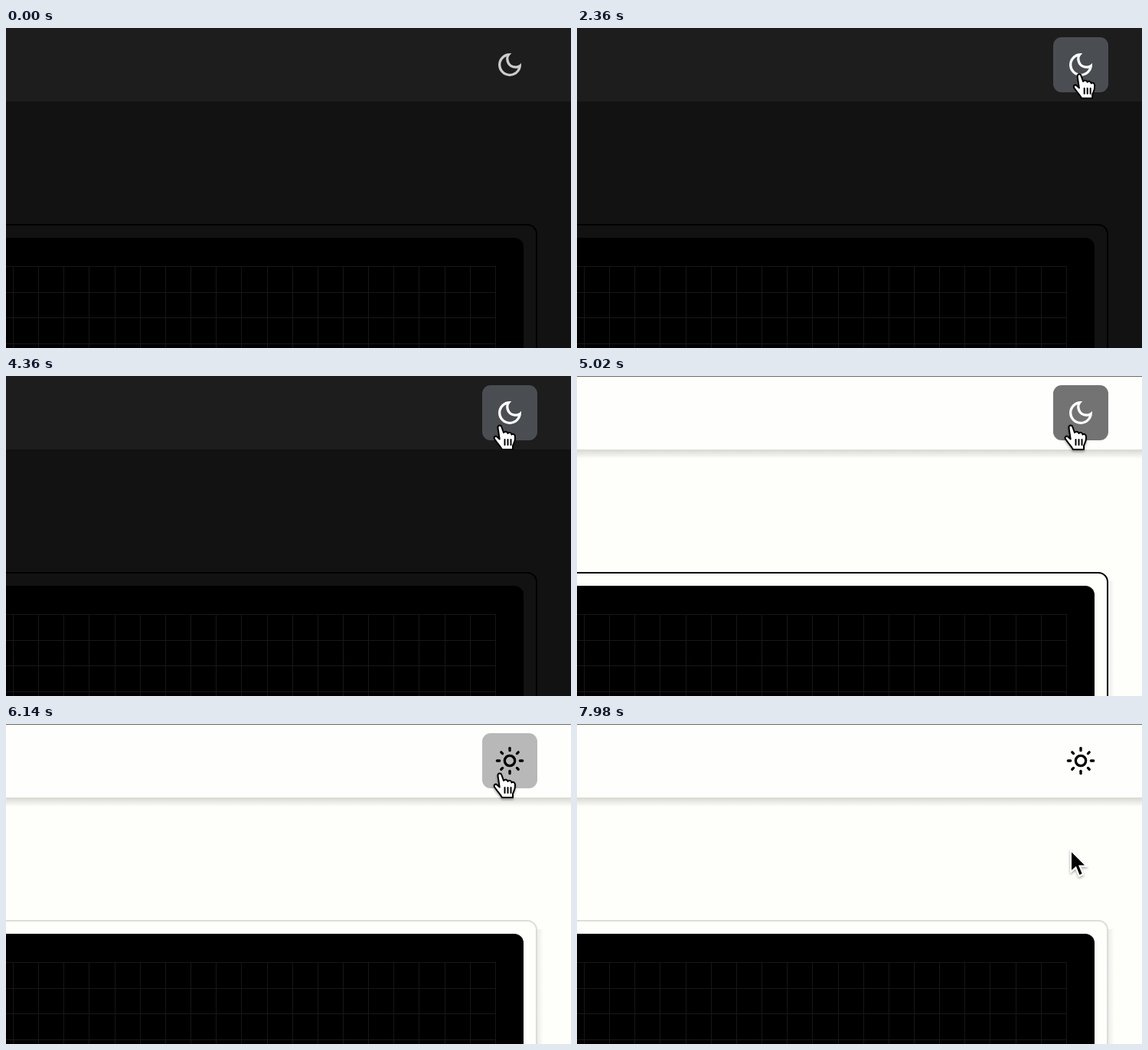
An HTML page that plays this animation: 738x418 px, repeating every 8000 ms.

```html
<!DOCTYPE html>
<html lang="en">
<head>
<meta charset="utf-8">
<title>Theme toggle</title>
<style>
  html, body { margin: 0; width: 100%; height: 100%; overflow: hidden; background: #121212; }
  svg { display: block; width: 100vw; height: 100vh; }
  .line { fill: none; stroke-width: 2; stroke-linecap: round; stroke-linejoin: round; }
</style>
</head>
<body>
<svg viewBox="0 0 738 418" preserveAspectRatio="none">
  <defs>
    <linearGradient id="under" x2="0" y2="1">
      <stop offset="0" stop-opacity=".13"/>
      <stop offset="1" stop-opacity="0"/>
    </linearGradient>
    <linearGradient id="side">
      <stop offset="0" stop-opacity=".07"/>
      <stop offset="1" stop-opacity="0"/>
    </linearGradient>
    <filter id="soft" x="-50%" y="-50%" width="200%" height="200%">
      <feDropShadow dx="0" dy="2" stdDeviation="1.6" flood-opacity=".35"/>
    </filter>
  </defs>

  <rect id="page" width="738" height="418"/>
  <rect id="header" width="738" height="96"/>
  <g id="light">
    <rect width="738" height="1" fill="#6c6c60"/>
    <rect y="96" width="738" height="2" fill="#dcdcd4"/>
    <rect y="98" width="738" height="10" fill="url(#under)"/>
    <rect x="694" y="268" width="8" height="150" fill="url(#side)"/>
  </g>
  <path id="border" class="line" d="M-2 257H681a12 12 0 0 1 12 12V420"/>
  <path d="M0 274H664a12 12 0 0 1 12 12V418H0Z"/>
  <g id="grid" fill="#171717" shape-rendering="crispEdges"></g>

  <rect id="button" x="622" y="12" width="72" height="72" rx="11"/>
  <g id="icon" transform="translate(638 28) scale(1.6667)">
    <path id="moon" d="M9.37 5.51C9.19 6.15 9.1 6.82 9.1 7.5c0 4.08 3.32 7.4 7.4 7.4.68 0 1.35-.09 1.99-.27C17.45 17.19 14.93 19 12 19c-3.86 0-7-3.14-7-7 0-2.93 1.81-5.45 4.37-6.49zM12 3a9 9 0 1 0 9 9c0-.46-.04-.92-.1-1.36a5.39 5.39 0 0 1-4.4 2.26 5.4 5.4 0 0 1-3.14-9.8C12.92 3.04 12.46 3 12 3z"/>
    <g id="sun" class="line"><circle cx="12" cy="12" r="4"/></g>
  </g>

  <g id="cursor">
    <path id="arrow" d="M0 0V28L6.5 22.5L11 33.5L16 31L11.5 20.5H20.5Z" stroke="#fff" stroke-width="2"/>
    <g id="hand" class="line" stroke="#000">
      <path fill="#fff" d="M-2.5 2C-3-2 1.5-3 2.5 1L5 8C6 6 10 6.5 10.5 9C11.5 7 15 7.5 15.5 10.5C17 9 20 10 20 13.5C20.5 19 18 22 17 25V30H3C1 26-3 22-6.5 17C-9 13.5-5.5 11.5-3.5 13.5L-.3 16.5Z"/>
      <path d="M6.5 17V24M10.5 17V24M14.5 17V24"/>
    </g>
  </g>
</svg>
<script>
const LOOP = 8000, CLICK = 4900, SWAP = 5060;
const HOVERS = [[1550, 2800], [3700, 7760]];
const PATH = [
  { t: 820, x: 746, y: 104 }, { t: 1560, x: 692, y: 26 },
  { t: 3060, x: 627, y: 91 }, { t: 3500, x: 629, y: 91 },
  { t: 4100, x: 645, y: 66 }, { t: 7700, x: 645, y: 66 },
  { t: 7920, x: 645, y: 165 }
];

const $ = id => document.getElementById(id);
const set = (id, name, value) => $(id).setAttribute(name, value);
const show = (id, on) => set(id, 'visibility', on ? 'visible' : 'hidden');
const mix = (a, b, k) => a + (b - a) * k;
const grey = v => `rgb(${[v, v, v].map(Math.round)})`;

// Eased 0 to 1, starting at a given time
function ramp(t, from, length) {
  const k = Math.min(1, Math.max(0, (t - from) / length));
  return k * k * (3 - 2 * k);
}

// How far the hover style is shown; lag delays its end
const hover = (t, lag = 0) => HOVERS.reduce(
  (sum, [enter, leave]) => sum + ramp(t, enter, 300) - ramp(t, leave + lag, 220), 0);

function pointer(t) {
  let { x, y } = PATH[0];
  for (let i = 1; i < PATH.length; i++) {
    const a = PATH[i - 1], b = PATH[i], k = ramp(t, a.t, b.t - a.t);
    x += (b.x - a.x) * k;
    y += (b.y - a.y) * k;
  }
  return `translate(${x.toFixed(2)} ${y.toFixed(2)})`;
}

function add(parent, name, attrs) {
  const el = document.createElementNS('http://www.w3.org/2000/svg', name);
  for (const key in attrs) el.setAttribute(key, attrs[key]);
  $(parent).append(el);
}

for (let i = 0; i < 20; i++)
  add('grid', 'rect', { x: Math.round(9 + i * 33.15), y: 311, width: 1, height: 107 });
for (let i = 0; i < 4; i++)
  add('grid', 'rect', { x: 0, y: Math.round(311 + i * 33.5), width: 640, height: 1 });
for (let i = 0; i < 8; i++)
  add('sun', 'path', { d: `M12 ${i % 2 ? 2.5 : 2}V4`, transform: `rotate(${i * 45} 12 12)` });

function draw(t) {
  const light = t >= CLICK, sunny = t >= SWAP;
  const over = HOVERS.some(([enter, leave]) => t >= enter && t < leave);
  const tint = ramp(t, CLICK, 300);

  set('page', 'fill', light ? '#fefefb' : '#121212');
  set('header', 'fill', light ? '#fefefc' : '#1d1d1d');
  show('light', light);
  set('border', 'stroke', grey(220 * ramp(t, 5030, 300)));

  set('button', 'fill', light ? grey(mix(76, 184, tint)) : '#4a4d51');
  set('button', 'opacity', hover(t));

  const glow = hover(t, 250), dark = mix(204, 255, glow);
  const color = grey(mix(dark, mix(48, 0, glow), ramp(t, SWAP, 250)));
  set('moon', 'fill', color);
  set('sun', 'stroke', color);
  show('moon', !sunny);
  show('sun', sunny);

  show('hand', over);
  show('arrow', !over);
  set('cursor', 'transform', pointer(t));
  set('cursor', 'filter', light ? 'url(#soft)' : 'none');
}

const start = performance.now();
function tick(now) {
  draw(Math.max(0, now - start) % LOOP);
  requestAnimationFrame(tick);
}
draw(0);
requestAnimationFrame(tick);
</script>
</body>
</html>
```
